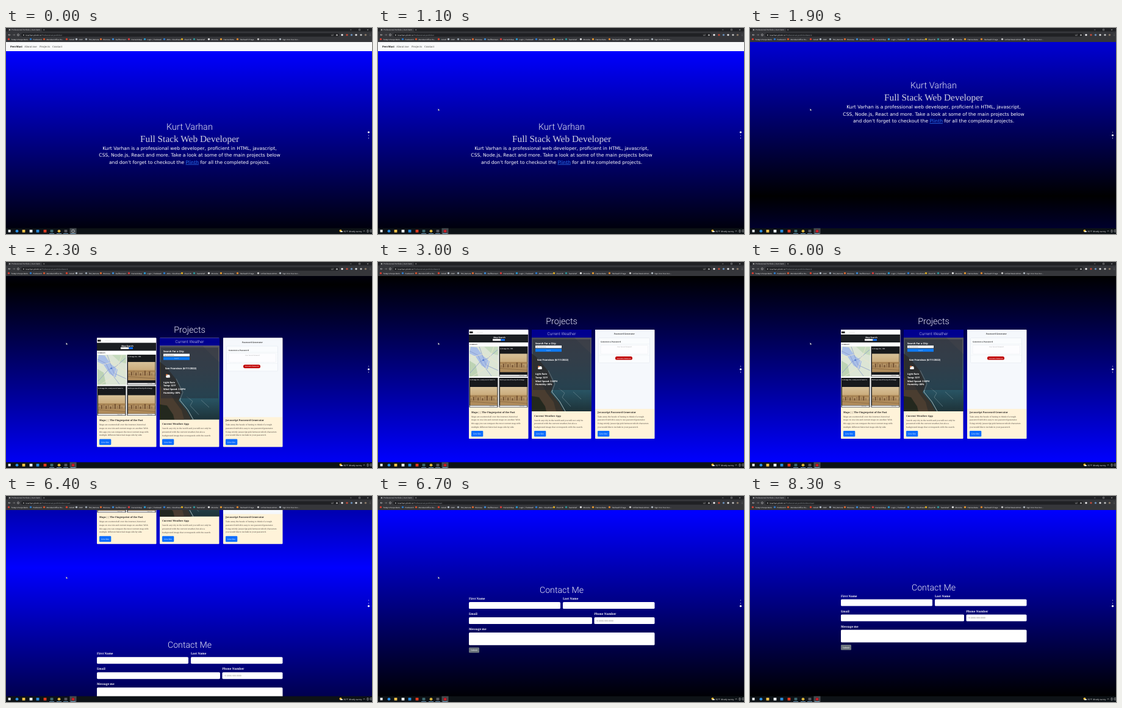
These frames come from a looping animation (600x338 px, 9900 ms). An HTML page:

```html
<!DOCTYPE html>
<html lang="en">
<head>
<meta charset="utf-8">
<title>Portfolio</title>
<style>
html, body { margin: 0; width: 100%; height: 100%; overflow: hidden; background: #000; }
svg { display: block; width: 100vw; height: 100vh; }
text { white-space: pre; text-rendering: geometricPrecision; }
.thin { font-family: Roboto, sans-serif; font-weight: 300; }
.serif { font-family: "Noto Serif", serif; }
.bold { font-family: "Noto Serif", serif; font-weight: 700; }
.times { font-family: "Liberation Serif", serif; }
.wide { font-family: "DejaVu Sans", sans-serif; }
.ui { font-family: "Open Sans", sans-serif; }
.semi { font-family: "Open Sans", sans-serif; font-weight: 700; }
</style>
</head>
<body>
<svg id="stage" viewBox="0 0 600 338"></svg>
<script>
const LOOP = 9900;
const stage = document.getElementById('stage');

const rect = (x, y, w, h, fill, r = 0, more = '') =>
  `<rect x="${x}" y="${y}" width="${w}" height="${h}" rx="${r}" fill="${fill}" ${more}/>`;
const dot = (x, y, r, fill, more = '') => `<circle cx="${x}" cy="${y}" r="${r}" fill="${fill}" ${more}/>`;
const line = (d, color, width = .6) => `<path d="${d}" fill="none" stroke="${color}" stroke-width="${width}"/>`;
const shape = (d, fill, more = '') => `<path d="${d}" fill="${fill}" ${more}/>`;
const text = (s, x, y, size, fill, cls = 'ui', anchor = 'start', more = '') =>
  `<text x="${x}" y="${y}" font-size="${size}" fill="${fill}" class="${cls}" text-anchor="${anchor}" ${more}>${s}</text>`;
const fade = (id, ...colors) => `<linearGradient id="${id}" x2="0" y2="1">` +
  colors.map((c, i) => `<stop offset="${i / (colors.length - 1)}" stop-color="${c}"/>`).join('') + '</linearGradient>';

const defs = `<defs>${fade('fall', '#00f', '#000')}${fade('rise', '#000', '#00f')}
  ${fade('sepia', '#d8c29a', '#c9a978', '#8d6a42')}
  ${fade('sea', '#4a4c56', '#40525f', '#2b5a6b', '#1d3238')}</defs>`;

function hero() {
  const para = ['Kurt Varhan is a professional web developer, proficient in HTML, javascript,',
    'CSS, Node.js, React and more. Take a look at some of the main projects below',
    'and don\'t forget to checkout the <tspan fill="#2a74f4" text-decoration="underline">Plinth</tspan> for all the completed projects.'];
  const links = [['PeerMast', 7, '#111'], ['About me', 30, '#777'], ['Projects', 55, '#777'], ['Contact', 76, '#777']];
  return rect(0, 38, 600, 306, 'url(#fall)') + rect(0, 23, 600, 15, '#f8f9fa') +
    links.map(([s, x, c]) => text(s, x, 32, 4.2, c, 'bold')).join('') +
    text('Kurt Varhan', 301, 167, 14.6, '#e4e4f4', 'thin', 'middle') +
    text('Full Stack Web Developer', 301, 186.5, 15.4, '#d2d2e2', 'times', 'middle') +
    para.map((s, i) => text(s, 301, 200 + i * 11.3, 7.62, '#fff', 'wide', 'middle')).join('');
}

function oldPrint(x, y, w, h) {
  let s = rect(x, y, w, h, 'url(#sepia)') + rect(x, y + h * .45, w, h * .12, '#a98555');
  for (let i = 0; i < 11; i++) {
    const tall = 2 + (i * 7 % 5);
    s += rect(x + 1 + i * (w - 4) / 11, y + h * .68 - tall, 2.2, tall + 2, i % 2 ? '#765434' : '#9a7850');
  }
  return s + rect(x, y + h * .75, w, h * .25, '#b08c5c') + line(`M${x} ${y + h * .8}L${x + w} ${y + h * .9}`, '#6d4f30', .5);
}

function mapSearch() {
  let s = rect(149, 111, 97, 128, '#fff') + rect(150, 114, 5.5, 3, '#222') +
    line('M162 115.5H172', '#ddd') + rect(149, 119, 97, 13, '#1b1e22') +
    text('Map Search', 199, 125, 3.4, '#fff', 'semi', 'middle') +
    rect(188, 126.3, 13.5, 3, '#fff') + rect(201.5, 126.3, 6.5, 3, '#0d6efd') +
    text('10 RESULTS', 150, 136, 2.3, '#222', 'semi');
  s += rect(149.5, 138.5, 47.5, 49.5, '#dce5d5') +
    shape('M152 139L162 140 172 154 183 163 180 176 170 170 160 155 150 150Z', '#a9bfe8') +
    shape('M174 139L197 139 197 153 186 150Z', '#c5dabd') +
    shape('M150 162L160 168 164 187 150 188Z', '#bdd3b4') +
    line('M150 146L164 153 170 166 186 187M196 144L180 158 168 163 151 182M166 139L177 169 197 178', '#8194c9', .7) +
    line('M150 157L173 151 197 166M154 188L177 174 190 139', '#eee6cd', .8) +
    dot(172.5, 161, 1.2, '#3f6fd0');
  const tiles = [[198.5, 138.5, 49.5], [149.5, 190, 48.5], [198.5, 190, 48.5]];
  const names = ['La Grange, Mo., 1876', 'La Grange, Mo., county seat of Lewis Co.', 'Bird\'s eye view of the city of La Grange'];
  tiles.forEach(([x, y, h], i) => {
    s += rect(x, y, 47, h, '#17191c') + text(names[i], x + 1.5, y + 4, 2.1, '#fff', 'semi') +
      oldPrint(x + 1.5, y + (i ? 15 : 12), 44.5, 30) + rect(x + 1, y + h - 3, 45, 2.4, '#eee') +
      text('View map', x + 33, y + h - 1.1, 1.8, '#555');
  });
  return s;
}

function weather() {
  const facts = ['Light Rain', 'Temp: 53°F', 'Wind Speed: 2 MPH', 'Humidity: 80%'];
  return rect(252, 111, 98, 13, '#00008f') + text('Current Weather', 301, 119.6, 6.6, '#dcdcf5', 'thin', 'middle') +
    rect(252, 124, 98, 121, 'url(#sea)') +
    shape('M252 150L262 158 278 178 288 200 283 214 296 230 304 245 252 245Z', '#35322c') +
    shape('M252 190L266 196 276 214 288 230 292 245 252 245Z', '#4a3d30') +
    shape('M252 220L264 222 274 237 276 245 252 245Z', '#23281e') +
    line('M279 178L290 200 285 213 298 229 307 245', '#a9b8b8', 1) +
    line('M296 207L306 215 302 222 316 237M320 213L333 225', '#64818a', .8) +
    shape('M322 124L350 124 350 151 337 139Z', '#5d5b60', 'opacity=".6"') +
    rect(254, 127, 94, 83, '#252a34', 0, 'opacity=".5"') +
    text('Search For a City:', 258, 134.5, 4, '#fff', 'semi') +
    rect(258, 137, 43, 4.2, '#fff') + text('San Fransisco', 259, 140.2, 2.6, '#444') +
    rect(258, 142.3, 43, 5, '#0d7af5', .6) + text('Search', 279.5, 145.7, 2.3, '#cfe4ff', 'ui', 'middle') +
    text('San Fransisco (6/11/2022)', 261, 162, 4.1, '#fff', 'semi') +
    dot(263.8, 172, 1.7, '#e8824a') + dot(264.2, 174.2, 1.9, '#f4f4f4') + dot(266.5, 173.3, 2.2, '#f4f4f4') +
    rect(262.4, 173.8, 6.5, 2.3, '#f4f4f4', 1) +
    facts.map((f, i) => text(f, 258, 185 + i * 5.8, 3.8, '#fff', 'semi')).join('');
}

const password = () => rect(356, 111, 97, 130, '#f5f8fc') +
  text('Password Generator', 404, 119, 3.3, '#333', 'bold', 'middle') +
  rect(361.5, 124.5, 84, 41, '#fafcfe', 1, 'stroke="#dde3ea" stroke-width=".5"') +
  text('Generate a Password', 365, 132, 3.1, '#333', 'bold') + line('M362 134.5H445', '#e3e8ee', .4) +
  rect(365, 136.5, 77.5, 14.5, '#fdfdff', 1, 'stroke="#d5dae2" stroke-width=".5" stroke-dasharray="1"') +
  text('Your Secure Password', 404, 140.3, 2.3, '#999', 'ui', 'middle') + line('M362 153H445', '#e3e8ee', .4) +
  rect(389, 155, 28, 5.6, '#c00000', 2.6) + text('Generate Password', 403, 158.7, 2.3, '#fff', 'semi', 'middle');

function projects() {
  const cards = [
    [149, 246, 'Maps || The Fingerprint of the Past', mapSearch, ['Maps are scattered all over the internet, historical',
      'maps on one site and current maps on another. With', 'this app you can compare the most current map with', 'multiple different historical maps side by side.']],
    [252, 252, 'Current Weather App', weather, ['Search any city in the world and you will not only be',
      'presented with the current weather, but also a', 'background image that corresponds with the search.']],
    [356, 246, 'Javascript Password Generator', password, ['Take away the hassle of having to think of a tough',
      'password with this easy to use password generator.', 'Using strictly javascript pick between which characters', 'you would like to include in your password.']]];
  return rect(0, 23, 600, 306.5, 'url(#rise)') + text('Projects', 301, 102.3, 14.4, '#e8e8f8', 'thin', 'middle') +
    cards.map(([x, y, title, picture, body]) =>
      rect(x, 111, 97.5, 179, '#fff3d9', 1) + picture() + text(title, x + 4, y + 1.6, 4, '#2c2a28', 'bold') +
      body.map((s, i) => text(s, x + 4, y + 8.6 + i * 5.7, 3.2, '#4c4842', 'serif')).join('') +
      rect(x + 4, 277, 19.3, 9.6, '#0d6efd', 1.3) + text('Live Site', x + 13.6, 283, 3.1, '#fff', 'serif', 'middle')).join('');
}

function contact() {
  const fields = [['First Name', 149, 165.7, 150, 11], ['Last Name', 303, 165.7, 150.5, 11], ['Email', 149, 190.7, 202, 11],
    ['Phone Number', 354.5, 190.7, 99, 11], ['Message me', 149, 215.7, 304.5, 20.7]];
  return rect(0, 23, 600, 306, 'url(#fall)') + text('Contact Me', 301, 154.6, 14.2, '#e8e8f8', 'thin', 'middle') +
    fields.map(([s, x, y, w, h]) => text(s, x, y, 4.75, '#fff', 'bold', 'start', 'style="font-weight:600"') +
      rect(x, y + 3.8, w, h, '#fff', 1.6)).join('') +
    text('+0 (000) 000-0000', 357, 201.4, 3.5, '#888', 'serif') +
    rect(149, 244, 17, 8.7, '#6c757d', 1.2) + text('Submit', 157.5, 249.6, 3.3, '#fff', 'serif', 'middle');
}

function browser() {
  const marks = [['Today\'s Hoops Rank..', 4, '#e03c31'], ['Postbench', 40, '#2d7dd2'], ['Meridian Office Ho...', 62, '#e0542c'],
    ['Oshelf', 99, '#e8432e'], ['CRW', 115, '#b9c2cc'], ['TRV_Remote', 131, '#9ca8b5'], ['Brenova', 155, '#e46a2e'],
    ['StaffConnect', 175, '#3b8ede'], ['NurseLinkup', 201, '#e23b3b'], ['Login | Tradewell', 227, '#27a0dc'],
    ['ADG - CloudCase', 259, '#2a7fd8'], ['Chart PX', 288, '#e6b422'], ['Teamshelf', 308, '#2b9aa0'], ['Morvida', 332, '#e8e8e8'],
    ['Harrow Data', 352, '#f0a030'], ['Telehealth Triage', 379, '#e58a2e'], ['Unified Desk Admin...', 413, '#c8c8c8'],
    ['Sign In to Your Acc...', 449, '#b0b8c0']];
  const tools = [[551, '#eee'], [559, '#c04a3a'], [566.5, '#6a8fb8'], [574, '#ddd'], [582, '#bbb'], [589.5, '#8a7a68']];
  return rect(0, 0, 600, 6, '#202124') + rect(3, .8, 56, 6, '#35363a', 1) + rect(0, 5.6, 600, 17.4, '#35363a') +
    dot(6, 3, 1.2, '#aaa') + text('Professional Portfolio | Kurt Var', 9, 4.1, 3, '#ddd') +
    line('M53.5 2l2 2m0-2l-2 2M61 3h2.4M62.2 1.8v2.4', '#ccc', .4) +
    line('M564 3h2.5M578.5 1.8h2.2v2.2h-2.2zM592 1.8l2.2 2.2m0-2.2l-2.2 2.2', '#ddd', .4) +
    line('M7.5 11.3h-3.5m1.4-1.4l-1.4 1.4l1.4 1.4', '#ddd', .6) + line('M11 11.3h3.5m-1.4-1.4l1.4 1.4l-1.4 1.4', '#888', .6) +
    dot(20, 11.3, 1.5, 'none', 'stroke="#ddd" stroke-width=".6"') +
    rect(25, 8.4, 521, 5.8, '#202124', 2.9) + rect(28, 10.8, 1.6, 1.6, '#bbb') +
    text('kvarhan.plinth.io<tspan fill="#9aa0a6">/Professional-portfolio/<tspan id="hash"></tspan></tspan>', 32.5, 12.5, 3.2, '#eee') +
    line('M533.5 10.5v2h2.8v-2M535 11.8l1.3-2', '#bbb', .4) + shape('M542.5 9.6l.6 1.3 1.3.2-1 .9.2 1.3-1.1-.7-1.1.7.2-1.3-1-.9 1.3-.2Z', '#bbb') +
    tools.map(([x, c]) => dot(x, 11.3, 1.6, c)).join('') + [9.8, 11.3, 12.8].map(y => dot(597, y, .4, '#ccc')).join('') +
    marks.map(([s, x, c]) => dot(x + .5, 18.3, 1.6, c) + text(s, x + 4.5, 19.5, 2.9, '#fff')).join('');
}

function taskbar() {
  const icons = [[18, '#2c8ee0'], [29, '#f0c14a'], [41, '#e8eef2'], [52, '#2a8ad8'], [64, '#dd3a20'], [75, '#3c666c'], [87, '#d6b13c'], [98, '#55555c']];
  return rect(0, 328.5, 600, 9.5, '#0d1216') + rect(3.6, 331, 4, 4.2, '#e8eef2') +
    icons.map(([x, c]) => rect(x - 2.4, 331, 4.8, 4.5, c, x == 18 || x == 87 ? 2.4 : .6)).join('') +
    rect(104.5, 328.5, 11, 9.5, '#444a4e') + dot(110, 333.3, 2.3, '#444a4e', 'id="rec" stroke="#ddd" stroke-width=".7"') +
    [75, 87, 98, 110].map(x => rect(x - 4, 337.2, 8, .8, '#7db4dc')).join('') +
    dot(548.5, 332.8, 2, '#f5b82e') + rect(548, 333, 4, 2, '#dfe5ea', 1) + text('82°F  Mostly sunny', 553.5, 334.7, 3.4, '#fff') +
    line('M585.5 334l1.5-1.6 1.5 1.6', '#eee', .5) + line('M592 331.5v3.5h2v-3.5zM597 331.5h3v3h-3z', '#ddd', .5);
}

stage.innerHTML = defs + `<g id="page">${hero()}<g transform="translate(0 320)">${projects()}</g>
  <g transform="translate(0 626)">${contact()}</g></g>` + [171, 176, 180.7].map(y => dot(594.5, y, .6, '#fff', 'class="bullet"')).join('') +
  browser() + taskbar() + shape('M0 0v3.4l.9-.7.6 1.3.6-.3-.6-1.2 1.1-.1Z', '#fff', 'id="cursor" stroke="#222" stroke-width=".2"');

const [page, hash, rec, cursor] = ['page', 'hash', 'rec', 'cursor'].map(id => document.getElementById(id));
const bullets = document.querySelectorAll('.bullet');
const clamp = v => Math.max(0, Math.min(1, v));
const smooth = v => v * v * (3 - 2 * v);

// The CSS "ease" curve, solved by bisection
function ease(x) {
  let lo = 0, hi = 1;
  for (let i = 0; i < 24; i++) {
    const u = (lo + hi) / 2, v = 1 - u;
    if (.75 * v * u + u ** 3 < x) lo = u; else hi = u;
  }
  return .3 * (1 - lo) ** 2 * lo + 3 * (1 - lo) * lo * lo + lo ** 3;
}

function draw(t) {
  const slide = start => ease(clamp((t - start) / 690));
  const section = (t >= 1789) + (t >= 6121);
  page.setAttribute('transform', `translate(0 ${-320 * slide(1789) - 306 * slide(6121)})`);
  hash.textContent = ['', '#work', '#contact'][section];
  bullets.forEach((b, i) => b.setAttribute('r', i == section ? 1.6 : .6));
  rec.setAttribute('fill', t < 200 ? '#444a4e' : '#d8202c');
  rec.setAttribute('stroke', t < 200 ? '#ddd' : '#7a1018');
  const away = 1 - smooth(clamp((t - 150) / 900)) + smooth(clamp((t - 7800) / 500));
  cursor.setAttribute('transform', `translate(${98.5 + 10 * away} ${132.3 + 200 * away})`);
  cursor.style.display = away < 1 ? '' : 'none';
}

const begin = performance.now();
function tick() {
  draw((performance.now() - begin) % LOOP);
  requestAnimationFrame(tick);
}
tick();
</script>
</body>
</html>
```
